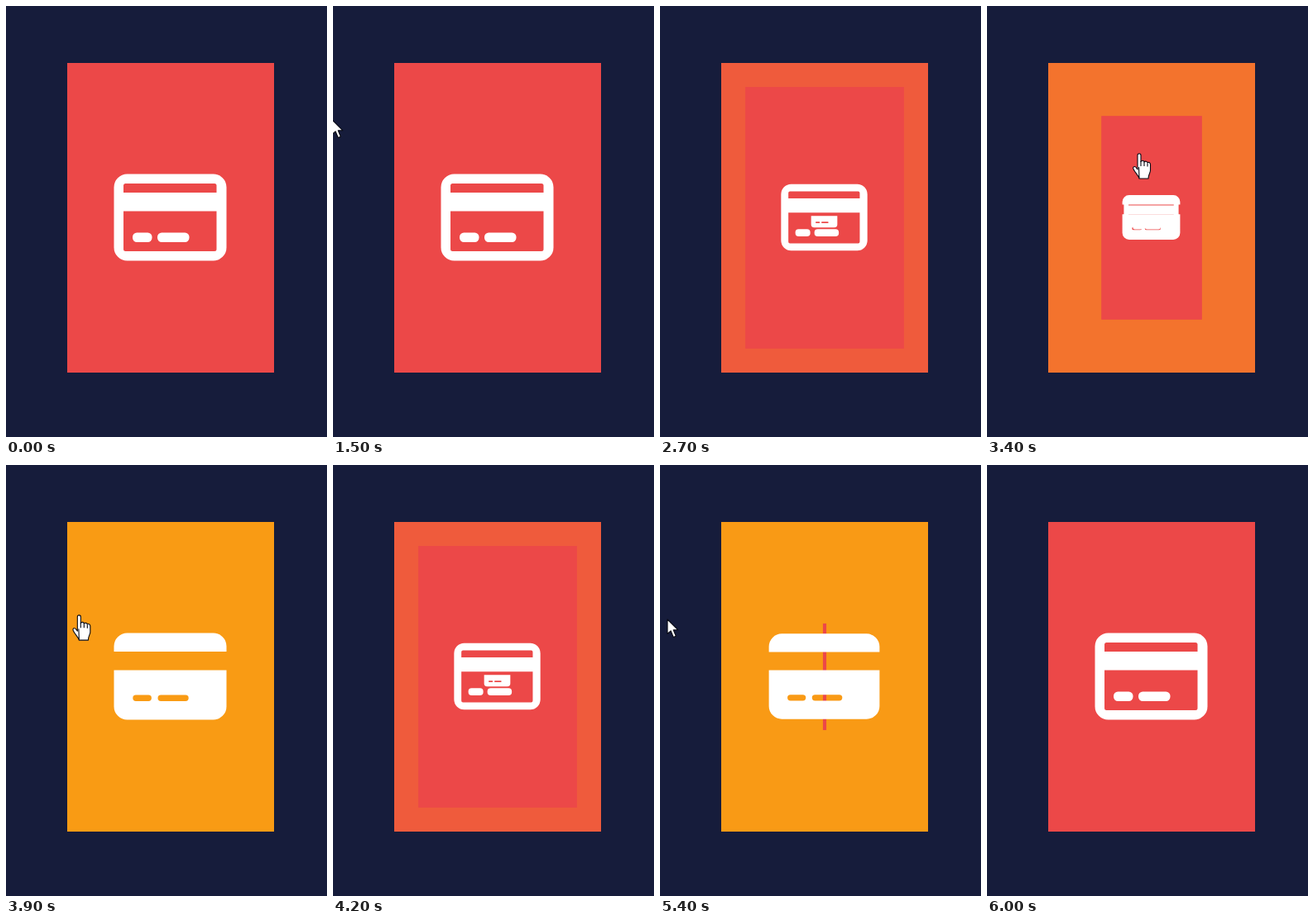
Recreate the animation shown at these times as an HTML page. Size 388 by 522 pixels, loop 6.5 s.

```html
<!DOCTYPE html>
<html lang="en">
<head>
<meta charset="utf-8">
<title>Card hover</title>
<style>
  html, body { margin: 0; width: 100%; height: 100%; overflow: hidden; background: #161c3b; }
  svg { display: block; width: 100%; height: 100%; }
  .icon { fill: #fff; fill-rule: evenodd; }
  .cursor { fill: #fff; stroke: #080a14; stroke-width: 1.1; stroke-linejoin: round; }
</style>
</head>
<body>
<svg viewBox="0 0 388 522">
  <rect id="frame" x="74" y="69" width="250" height="375"/>
  <rect id="panel" fill="#ec4848"/>
  <!-- icons are drawn around their own centre -->
  <g id="outline" class="icon">
    <path d="M-52-52.5H52a16 16 0 0 1 16 16V36.5a16 16 0 0 1-16 16H-52a16 16 0 0 1-16-16V-36.5a16 16 0 0 1 16-16Z
             M-54-41a2.5 2.5 0 0 0-2.5 2.5V-30H56V-38.5a2.5 2.5 0 0 0-2.5-2.5Z
             M-56.5-7.500V38.500a2.500 2.500 0 0 0 2.500 2.500H53.500a2.500 2.500 0 0 0 2.500-2.500V-7.500Z"/>
    <rect x="-45.500" y="18.500" width="23.500" height="11.500" rx="5.200"/>
    <rect x="-15.500" y="18.500" width="38.500" height="11.500" rx="5.200"/>
  </g>
  <path id="solid" class="icon"
        d="M-68-30V-36.500a16 16 0 0 1 16-16H52a16 16 0 0 1 16 16V-30Z
           M-68-7.500H68V36.500a16 16 0 0 1-16 16H-52a16 16 0 0 1-16-16Z
           M-41.500 22.500a3.700 3.700 0 0 0 0 7.400h15.200a3.700 3.700 0 0 0 0-7.400Z
           M-11.300 22.500a3.700 3.700 0 0 0 0 7.400h29.800a3.700 3.700 0 0 0 0-7.400Z"/>
  <path id="arrow" class="cursor" d="M0 0V17.500L4 13.800L7.200 21.500L10.300 20.200L7.200 12.800H12.800Z"/>
  <g id="hand" class="cursor">
    <path d="M-2 2C-2-1 2-1 2 2V9.500C3 7.500 6 8 6 10C7 8.500 10 9 10 11C11 9.700 13.500 10.500 13.500 13V20
             C13.500 23 11 25 11 30H0C-1-0 0 30 0 30C-1 26-5 23-7 18.500C-8.500 15.500-5 14.500-3.500 17L-2 19Z"/>
    <path d="M2 9V15M6 10V15M10 11.500V15.500" fill="none"/>
  </g>
</svg>
<script>
  const LOOP = 6500, STEP = 100, FADE = 600;
  const RED = [236, 72, 72], ORANGE = [249, 155, 20];
  const CENTER = [198.5, 256];

  // Pointer enters and leaves the card alternately.
  const crossings = [1560, 2420, 3220, 3920, 4660, 5382];

  // Pointer path: time, x, y
  const path = [
    [1450, -60, 130], [1500, -1, 138], [1560, 76, 143], [1700, 146, 151], [2200, 154, 156],
    [2350, 130, 160], [2420, 74, 163], [2500, 10, 165], [2550, -40, 166],
    [3050, -40, 168], [3100, 2, 170], [3220, 76, 174], [3400, 184, 179], [3500, 190, 181],
    [3800, 160, 183], [3920, 74, 182], [4000, 0, 181], [4050, -40, 181],
    [4500, -40, 183], [4600, 1, 184], [4660, 76, 184], [4800, 165, 186],
    [5200, 160, 188], [5380, 76, 187], [5400, 9, 187], [5480, -40, 187]
  ];

  const $ = id => document.getElementById(id);
  const lerp = (a, b, k) => a + (b - a) * k;

  // CSS "ease" timing curve, solved by bisection.
  function ease(x) {
    if (x >= 1) return 1;
    let lo = 0, hi = 1, u;
    for (let i = 0; i < 24; i++) {
      u = (lo + hi) / 2;
      if (0.75 * u * (1 - u) + u ** 3 < x) lo = u; else hi = u;
    }
    return 0.3 * u * (1 - u) ** 2 + 3 * u * u * (1 - u) + u ** 3;
  }

  function hoverAmount(t) {
    const passed = crossings.filter(c => c <= t);
    if (!passed.length) return 0;
    const k = ease((t - passed[passed.length - 1]) / FADE);
    return passed.length % 2 ? k : 1 - k;
  }

  function pointerAt(t) {
    const i = path.findIndex(p => p[0] > t);
    if (i < 1) return [-60, 0];
    const a = path[i - 1], b = path[i];
    const k = (t - a[0]) / (b[0] - a[0]);
    return [lerp(a[1], b[1], k), lerp(a[2], b[2], k)];
  }

  const place = (el, [x, y], scale = 1) =>
    el.setAttribute("transform", `translate(${x} ${y}) scale(${scale})`);

  const show = (el, visible) => { el.style.display = visible ? "" : "none"; };

  function draw(t) {
    const p = hoverAmount(t), inset = 125 * p;
    $("frame").setAttribute("fill", `rgb(${RED.map((c, i) => Math.round(lerp(c, ORANGE[i], p)))})`);
    const box = { x: 74 + inset, y: 69 + inset, width: 250 - 2 * inset, height: 375 - 2 * inset };
    for (const key in box) $("panel").setAttribute(key, box[key]);

    place($("outline"), CENTER, 1 - p);
    place($("solid"), CENTER, p);
    show($("outline"), p < 1);
    show($("solid"), p > 0);

    const pos = pointerAt(t), inside = pos[0] >= 74;
    place($("arrow"), pos);
    place($("hand"), pos);
    show($("arrow"), !inside);
    show($("hand"), inside);
  }

  const start = performance.now();
  function tick() {
    const t = (performance.now() - start) % LOOP;
    draw(Math.floor(t / STEP) * STEP);
    requestAnimationFrame(tick);
  }
  tick();
</script>
</body>
</html>
```
